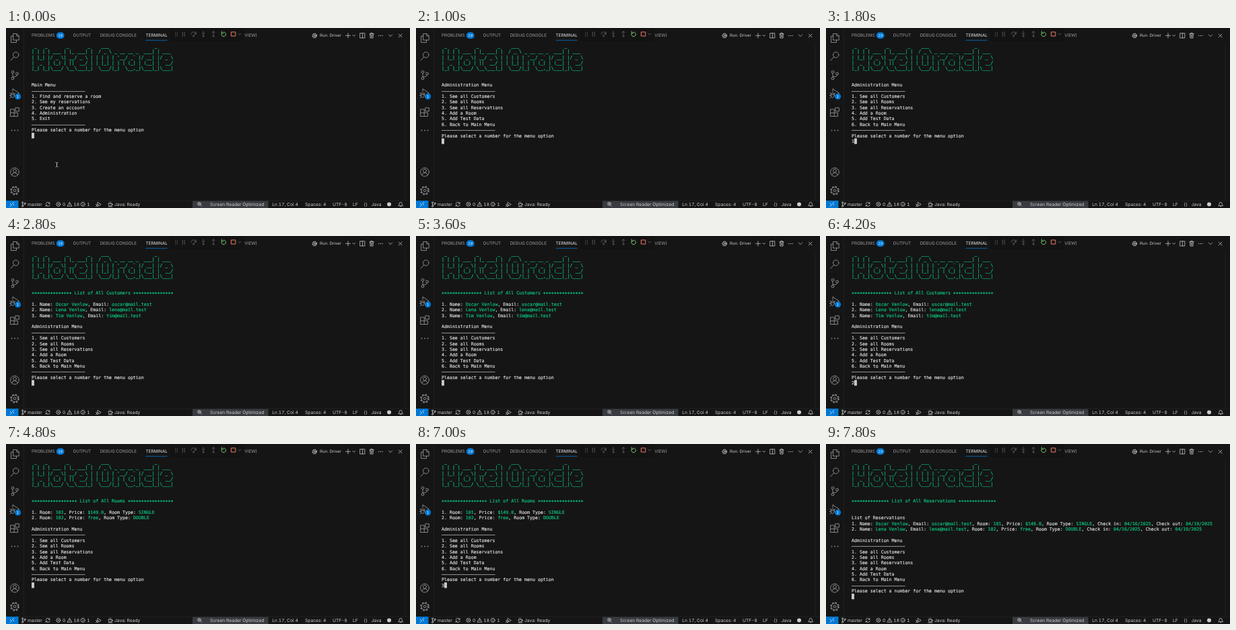
An HTML page for the animation above (8000 ms loop, 600 by 268 pixels).

```html
<!DOCTYPE html>
<html lang="en">
<head>
<meta charset="utf-8">
<title>Hotel terminal</title>
<style>
  html, body { margin: 0; height: 100%; overflow: hidden; background: #151515; }
  svg { display: block; width: 100vw; height: 100vh; }
  text { white-space: pre; text-rendering: geometricPrecision; font-variant-numeric: tabular-nums; }
  #term { font: 6.6px "DejaVu Sans Mono", monospace; fill: #e4e4e4; stroke: #e4e4e4; stroke-width: .14; }
  #term .hi { fill: #0dbc79; stroke: #0dbc79; stroke-width: .22; }
  .ui { font-family: Inter, "Open Sans", sans-serif; fill: #ccc; }
  .tabs { font-size: 6.4px; fill: #9d9d9d; }
  .status { font-size: 6.7px; }
  .badge { font-size: 5.4px; fill: #fff; text-anchor: middle; }
  .line { fill: none; stroke: #ccc; stroke-width: .75; stroke-linecap: round; stroke-linejoin: round; }
  .side { stroke: #868686; stroke-width: 1; }
  .dim { stroke: #6c6c6c; }
</style>
</head>
<body>
<svg viewBox="0 0 600 268">
  <rect width="600" height="268" fill="#151515"/>
  <path d="M26.5 0V257M0 257.2H600M593 22V257" stroke="#282828" stroke-width=".7"/>

  <!-- activity bar -->
  <g class="line side">
    <path d="M11 8.5h5l3.2 3.2v6.3H11zM15.8 8.5v3.4h3.4M11 12H7.5v9.5h8V18"/>
    <circle cx="14.7" cy="40" r="4.2"/><path d="M11.7 43.2L7 48.2"/>
    <circle cx="10" cy="65.5" r="1.9"/><circle cx="10" cy="75" r="1.9"/><circle cx="16.5" cy="68" r="1.9"/>
    <path d="M10 67.4v5.7M16.5 69.9q0 2.4-3 2.4h-1.5q-2 0-2 .8"/>
    <path d="M10 94.5V90.5L19.5 97l-4 2.6"/>
    <ellipse cx="9.8" cy="100" rx="2.6" ry="3.5"/><path d="M7.3 99h5M5.8 96.8l1.7 1.2M13.8 96.8l-1.7 1.2M5.5 100.5h1.7M5.8 104.2l1.8-1.6"/>
    <path d="M7 121h5.2v10.5H7zM7 126.3h10.5v5.2H7M14.2 118.8h5.2v5.2h-5.2z"/>
    <circle cx="13" cy="214.5" r="6.4"/><circle cx="13" cy="212.6" r="2.5"/><path d="M8.7 219q.5-3.4 4.3-3.4t4.3 3.4"/>
    <circle cx="13" cy="242" r="4.9"/><circle cx="13" cy="242" r="1.8"/>
    <circle cx="13" cy="242" r="6" stroke-width="1.6" stroke-linecap="butt" stroke-dasharray="2.4 2.312"/>
  </g>
  <g fill="#868686"><circle cx="8.5" cy="152.5" r=".9"/><circle cx="13" cy="152.5" r=".9"/><circle cx="17.5" cy="152.5" r=".9"/></g>
  <circle cx="17.6" cy="102" r="4.5" fill="#0078d4"/>
  <text class="ui badge" x="17.6" y="104">1</text>

  <!-- panel tabs -->
  <g class="ui tabs">
    <text x="38" y="13.4">PROBLEMS</text>
    <text x="99.5" y="13.4">OUTPUT</text>
    <text x="139.5" y="13.4">DEBUG CONSOLE</text>
    <text x="207.5" y="13.4" fill="#e7e7e7">TERMINAL</text>
    <text x="354.3" y="13.4">VIEW)</text>
  </g>
  <rect x="207.5" y="17.8" width="32" height=".8" fill="#0078d4"/>
  <rect x="74.7" y="6.3" width="12" height="9.6" rx="4.8" fill="#0078d4"/>
  <text class="ui badge" x="80.7" y="13.1">19</text>

  <!-- debug toolbar -->
  <rect x="245" y="-2" width="107" height="21" rx="2" fill="#131313" stroke="#0e0e0e" stroke-width=".6"/>
  <path d="M251.8 6.4v6M254.4 6.4v6" stroke="#777" stroke-width="1" stroke-dasharray="1 1.5"/>
  <g class="line dim">
    <path d="M262.2 6v6.5M265.2 6v6.5"/>
    <path d="M275 9q.7-3.3 3.5-3.3T282 9M282.3 6v3h-3"/><circle cx="278.5" cy="11.8" r="1"/>
    <path d="M293 4.8v4.6M291 7.6l2 2 2-2"/><circle cx="293" cy="12" r="1"/>
    <path d="M308 9.8V5M306 6.9l2-2 2 2"/><circle cx="308" cy="12" r="1"/>
  </g>
  <path class="line" style="stroke:#7bc96f;stroke-width:1" d="M320.6 7.2a3.3 3.3 0 1 0 2.6-1.2M320.3 5v2.5h2.5"/>
  <rect class="line" style="stroke:#f27b62;stroke-width:1" x="334.8" y="6" width="6" height="6"/>
  <path class="line dim" d="M345 8.2l2 2 2-2"/>

  <!-- panel actions -->
  <text class="ui" x="466" y="13.4" font-size="6.1">Run: Driver</text>
  <g class="line">
    <circle cx="458.3" cy="11.4" r="2.6"/><circle cx="458.3" cy="11.4" r=".9"/>
    <circle cx="458.3" cy="11.4" r="3.4" stroke-width="1" stroke-linecap="butt" stroke-dasharray="1.35 1.32"/>
    <path d="M508 7.8v7M504.5 11.3h7M514.8 10.4l1.9 1.9 1.9-1.9"/>
    <path d="M526 7.8h6.8v7H526zM529.4 7.8v7"/>
    <path d="M539.8 8.8h6.4M541.6 8.8V7.5h2.8v1.3M540.6 8.8l.4 6.2h4l.4-6.2M542.2 10.4v3M543.8 10.4v3"/>
    <path d="M568.4 10l2.6 2.6 2.6-2.6M583.2 9l4.8 4.8M588 9l-4.8 4.8"/>
  </g>
  <g fill="#ccc"><circle cx="553.8" cy="11.4" r=".65"/><circle cx="556.4" cy="11.4" r=".65"/><circle cx="559" cy="11.4" r=".65"/></g>

  <!-- status bar -->
  <rect y="257" width="18.5" height="11" fill="#0078d4"/>
  <rect x="277" y="257.5" width="112.5" height="10.5" fill="#383b3f"/>
  <g class="line">
    <path stroke="#fff" d="M6.2 261.2l2.2 2.2-2.2 2.2M11.8 259.4l-2.2 2.2 2.2 2.2"/>
    <circle cx="24.5" cy="260" r="1.1"/><circle cx="24.5" cy="265.4" r="1.1"/><circle cx="28.2" cy="261.2" r="1.1"/>
    <path d="M24.5 261.1v3.2M28.2 262.3q0 1.4-3.7 1.7"/>
    <path d="M59 261.6a3 3 0 0 1 5.6-.4M65 259.6v1.8h-1.8M65.2 263.4a3 3 0 0 1-5.6.4M59.2 265.4v-1.8H61"/>
    <circle cx="77.8" cy="262.4" r="3"/><path d="M76.6 261.2l2.4 2.4M79 261.2l-2.4 2.4"/>
    <path d="M94.6 259.4l3.2 5.8h-6.4zM94.6 261.6v1.6"/>
    <circle cx="114.2" cy="262.4" r="3"/><path d="M114.2 262.2v1.7M114.2 260.8v.1"/>
    <path d="M136 261.2v-1.8l5.2 3.2-2.8 1.8"/><ellipse cx="136" cy="264" rx="1.3" ry="1.7"/><path d="M133.6 262.6l1 .6M133.6 265.6l1-.6"/>
    <path d="M152.4 261.4h4.8v2.2q0 1.2-1.2 1.2h-2.4q-1.2 0-1.2-1.2zM157.2 261.8q1.8 0 1.4 1.3-.3.8-1.4.8M152 266h5.8M153.6 259.2v.9M155.6 259.2v.9"/>
    <circle cx="287" cy="261.8" r="2.4"/><path d="M288.8 263.6l1.8 1.8M286 261.8h2M287 260.8v2"/>
    <path d="M583 264.4q1.2-1 1.2-2.8 0-2.2 2-2.2t2 2.2q0 1.8 1.2 2.8zM585.4 265.6h1.6"/>
  </g>
  <circle cx="569" cy="262.4" r="3" fill="#ccc"/>
  <g class="ui status" id="status"></g>

  <g id="term"></g>
  <path id="mouse" class="line" d="M74 200.2q1.5 0 1.5 1v4.6q0 1-1.5 1M77 200.2q-1.5 0-1.5 1v4.6q0 1 1.5 1"/>
</svg>
<script>
const NS = 'http://www.w3.org/2000/svg';
const LOOP = 8000, LEFT = 38, TOP = 22.4, ROW = 8.35, CELL = 3.973, BASE = 6.5;
const term = document.getElementById('term');
const mouse = document.getElementById('mouse');

function add(parent, tag, attrs, text = '') {
  const el = document.createElementNS(NS, tag);
  for (const key in attrs) el.setAttribute(key, attrs[key]);
  el.textContent = text;
  return parent.appendChild(el);
}

const status = [
  [32, 'master'], [84, '0'], [100.3, '18'], [120.3, '1'], [161, 'Java: Ready'],
  [303, 'Screen Reader Optimized'], [395.3, 'Ln 17, Col 4'], [444, 'Spaces: 4'],
  [485, 'UTF-8'], [515, 'LF'], [531.5, '{}'], [542.5, 'Java'],
];
for (const [x, label] of status) add(document.getElementById('status'), 'text', { x, y: 264.8 }, label);

// Text inside braces is green.
const banner = [
  " _   _       _       _    ___                 _",
  "| | | | ___ | |_ ___| |  / _ \\ _ __ __ _  ___| | ___",
  "| |_| |/ _ \\| __/ _ \\ | | | | | '__/ _` |/ __| |/ _ \\",
  "|  _  | (_) | ||  __/ | | |_| | | | (_| | (__| |  __/",
  "|_| |_|\\___/ \\__\\___|_|  \\___/|_|  \\__,_|\\___|_|\\___|",
].map(line => `{${line}}`).concat('', '');

const rule = '–'.repeat(20);
const menu = (title, ...items) => [
  title, rule, ...items.map((item, i) => `${i + 1}. ${item}`), rule,
  'Please select a number for the menu option',
];
const heading = (title, stars) => `{${'∗'.repeat(stars)} ${title} ${'∗'.repeat(stars)}}`;
const numbered = rows => rows.map((row, i) => `${i + 1}. ${row}`);

const guests = [['Oscar Venlow', 'oscar'], ['Lena Venlow', 'lena'], ['Tim Venlow', 'tim']]
  .map(([name, box]) => `Name: {${name}}, Email: {${box}@mail.test}`);
const rooms = [['101', '$149.0', 'SINGLE'], ['102', 'free', 'DOUBLE']]
  .map(([no, price, type]) => `Room: {${no}}, Price: {${price}}, Room Type: {${type}}`);
const stays = rooms.map((room, i) =>
  `${guests[i]}, ${room}, Check in: {04/16/2025}, Check out: {04/19/2025}`);

const main = menu('Main Menu', 'Find and reserve a room', 'See my reservations',
  'Create an account', 'Administration', 'Exit');
const admin = menu('Administration Menu', 'See all Customers', 'See all Rooms',
  'See all Reservations', 'Add a Room', 'Add Test Data', 'Back to Main Menu');
const customerList = [heading('List of All Customers', 15), '', ...numbered(guests), '', ...admin];
const roomList = [heading('List of All Rooms', 17), '', ...numbered(rooms), '', ...admin];
const stayList = [heading('List of All Reservations', 14), '', '', 'List of Reservations',
  ...numbered(stays), '', ...admin];

// start time, screen, typed input
const steps = [
  [0, main, ''], [600, main, '4'],
  [1000, admin, ''], [1800, admin, '1'],
  [2800, customerList, ''], [4200, customerList, '2'],
  [4800, roomList, ''], [7000, roomList, '3'],
  [7800, stayList, ''],
];

function draw([, screen, input]) {
  term.textContent = '';
  const lines = [...banner, ...screen, input];
  lines.forEach((line, row) => {
    const text = add(term, 'text', { x: LEFT, y: TOP + row * ROW + BASE });
    line.split(/[{}]/).forEach((part, i) => {
      if (part) add(text, 'tspan', i % 2 ? { class: 'hi' } : {}, part);
    });
  });
  add(term, 'rect', {
    x: LEFT + input.length * CELL, y: TOP + (lines.length - 1) * ROW,
    width: CELL, height: ROW, fill: '#c8c8c8', stroke: 'none',
  });
}

let shown;
function tick() {
  const t = performance.now() % LOOP;
  const step = steps.findLast(s => s[0] <= t);
  if (step !== shown) draw(shown = step);
  mouse.setAttribute('transform', t < 400 ? '' : 'translate(1 1)');
  mouse.setAttribute('visibility', t < 600 ? 'visible' : 'hidden');
  requestAnimationFrame(tick);
}
tick();
</script>
</body>
</html>
```
